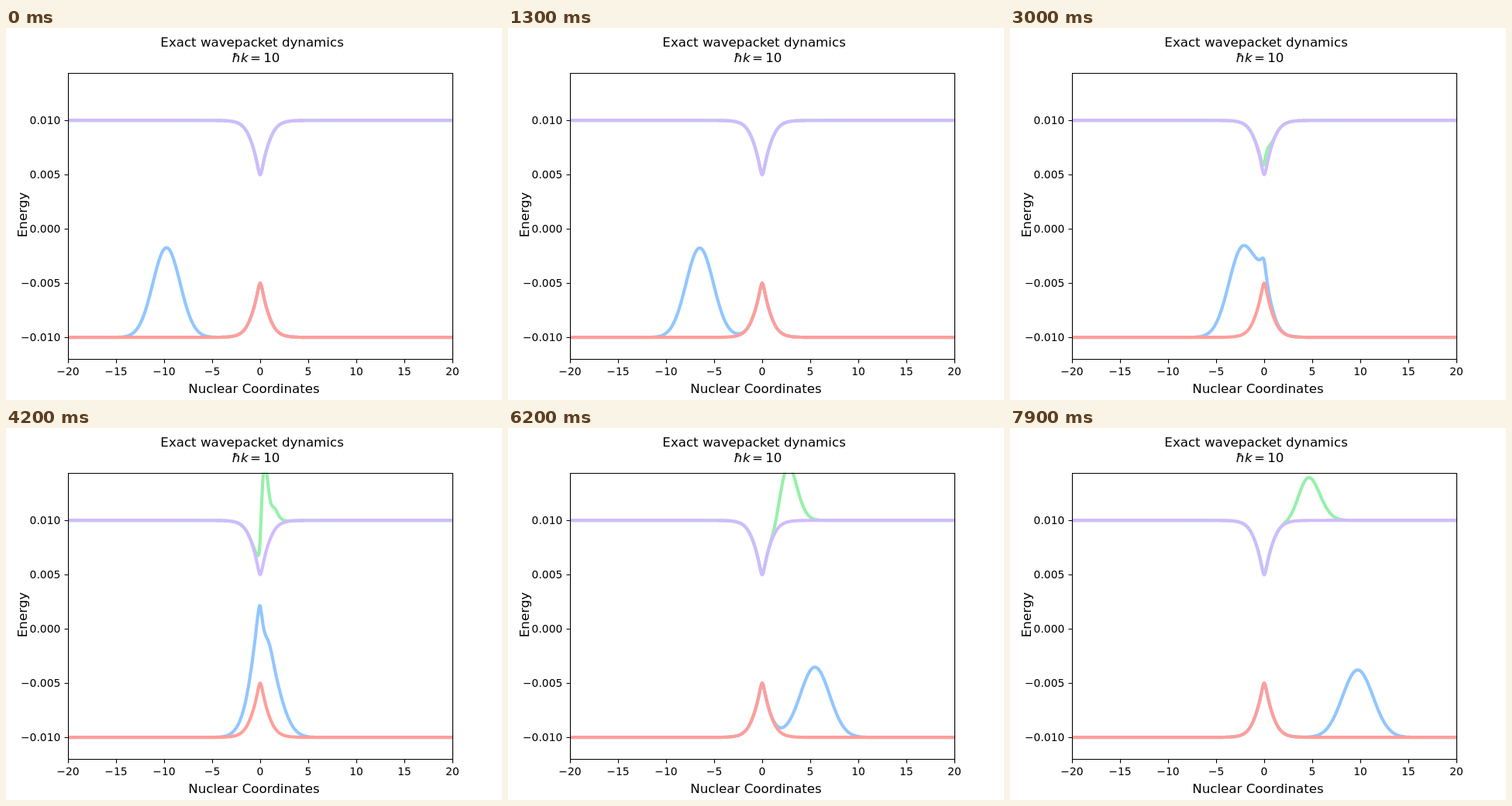
An HTML page that plays this animation: 640x480 px, repeating every 8 s.

```html
<!DOCTYPE html>
<html lang="en">
<head>
<meta charset="utf-8">
<title>Exact wavepacket dynamics</title>
<style>
  html, body { margin: 0; width: 100%; height: 100%; overflow: hidden; background: #fff; }
  svg { display: block; width: 640px; height: 480px; font: 13.889px "DejaVu Sans", sans-serif; }
  .label { font-size: 16.667px; text-anchor: middle; }
  .curve { fill: none; stroke-width: 4.167; stroke-linejoin: round; }
  #axes { fill: none; stroke: #000; stroke-width: 1.111; }
</style>
</head>
<body>
<svg viewBox="0 0 640 480">
  <clipPath id="plot"><rect x="80" y="57.6" width="496" height="369.6"/></clipPath>
  <g clip-path="url(#plot)">
    <path class="curve" id="lowerWave" stroke="#92c6ff"/>
    <path class="curve" id="upperWave" stroke="#97f0aa"/>
    <path class="curve" id="lowerState" stroke="#ff9f9a"/>
    <path class="curve" id="upperState" stroke="#d0bbff"/>
  </g>
  <path id="axes"/>
  <g id="ticks"></g>
  <text class="label" x="317.6" y="24">Exact wavepacket dynamics</text>
  <text y="44" font-size="16.667"><tspan x="291.5" font-style="italic">ħk</tspan><tspan x="315">=</tspan><tspan x="332.2">10</tspan></text>
  <text class="label" x="320" y="471">Nuclear Coordinates</text>
  <text class="label" transform="translate(27 241) rotate(-90)">Energy</text>
</svg>
<script>
const $ = id => document.getElementById(id);
const px = x => 328 + 12.4 * x;
const py = e => 259.2 - 14000 * e;

// Axes and tick labels
let axes = 'M80.5 58.5H576.5V427.5H80.5Z';
const tickText = (x, y, anchor, s) =>
  `<text x="${x}" y="${y}" text-anchor="${anchor}">${s.replace('-', '\u2212')}</text>`;
let labels = '';
for (let x = -20; x <= 20; x += 5) {
  axes += `M${px(x) + 0.5} 427.5v5`;
  labels += tickText(px(x), 448, 'middle', String(x));
}
for (let i = -2; i <= 2; i++) {
  const y = Math.round(py(i * 0.005)) + 0.5;
  axes += `M80.5 ${y}h-5`;
  labels += tickText(70.3, y + 4.5, 'end', (i * 0.005).toFixed(3));
}
$('axes').setAttribute('d', axes);
$('ticks').innerHTML = labels;

// Two-state avoided crossing on a periodic grid
const N = 1024, L = 60, dx = L / N, mass = 2000, k0 = 10, x0 = -10;
const dt = 10, stepsPerFrame = 5, frames = 80, frameMs = 100;
const grid = f => Float64Array.from({ length: N }, (_, i) => f((i - N / 2) * dx, i));
const X = grid(x => x);
const V = grid(x => Math.sign(x) * 0.01 * (1 - Math.exp(-1.6 * Math.abs(x))));
const W = grid(x => 0.005 * Math.exp(-x * x));
const E = grid((x, i) => Math.hypot(V[i], W[i]));
const theta = grid((x, i) => Math.atan2(W[i], V[i]) / 2);

// Initial packet: |psi|^2 has standard deviation sqrt(2)
const amp = x => (4 * Math.PI) ** -0.25 * Math.exp(-((x - x0) ** 2) / 8);
const ar = grid(x => amp(x) * Math.cos(k0 * x)), ai = grid(x => amp(x) * Math.sin(k0 * x));
const br = new Float64Array(N), bi = new Float64Array(N);

const twC = grid((x, i) => Math.cos(2 * Math.PI * i / N));
const twS = grid((x, i) => -Math.sin(2 * Math.PI * i / N));

// In-place radix-2 transform; swapping re and im gives the inverse
function fft(re, im) {
  for (let i = 1, j = 0; i < N; i++) {
    let bit = N >> 1;
    for (; j & bit; bit >>= 1) j ^= bit;
    j ^= bit;
    if (i < j) {
      [re[i], re[j]] = [re[j], re[i]];
      [im[i], im[j]] = [im[j], im[i]];
    }
  }
  for (let half = 1; half < N; half *= 2) {
    const stride = N / (2 * half);
    for (let s = 0; s < N; s += 2 * half) {
      for (let j = 0; j < half; j++) {
        const p = s + j, q = p + half, c = twC[j * stride], d = twS[j * stride];
        const u = re[q] * c - im[q] * d, v = re[q] * d + im[q] * c;
        re[q] = re[p] - u; im[q] = im[p] - v;
        re[p] += u; im[p] += v;
      }
    }
  }
}

const phase = grid((x, i) => {
  const k = 2 * Math.PI / L * (i < N / 2 ? i : i - N);
  return -k * k / (2 * mass) * dt;
});
const kinC = phase.map(p => Math.cos(p) / N), kinS = phase.map(p => Math.sin(p) / N);

function kinetic(re, im) {
  fft(re, im);
  for (let i = 0; i < N; i++) {
    const r = re[i], m = im[i];
    re[i] = r * kinC[i] - m * kinS[i];
    im[i] = r * kinS[i] + m * kinC[i];
  }
  fft(im, re);
}

const potC = E.map(e => Math.cos(e * dt / 2)), potS = E.map(e => Math.sin(e * dt / 2) / e);

function halfPotential() {
  for (let i = 0; i < N; i++) {
    const c = potC[i], v = V[i] * potS[i], w = W[i] * potS[i];
    const a = ar[i], b = ai[i], p = br[i], q = bi[i];
    ar[i] = c * a + v * b + w * q;
    ai[i] = c * b - v * a - w * p;
    br[i] = c * p + w * b - v * q;
    bi[i] = c * q - w * a + v * p;
  }
}

function step() {
  halfPotential();
  kinetic(ar, ai);
  kinetic(br, bi);
  halfPotential();
}

// Population density on the adiabatic state (u, v)
const density = (u, v) => grid((x, i) =>
  (u(theta[i]) * ar[i] + v(theta[i]) * br[i]) ** 2 +
  (u(theta[i]) * ai[i] + v(theta[i]) * bi[i]) ** 2);

const lower = [], upper = [];
for (let f = 0; f < frames; f++) {
  for (let s = 0; s < stepsPerFrame; s++) step();
  lower.push(density(t => -Math.sin(t), Math.cos));
  upper.push(density(Math.cos, Math.sin));
}

// Display scales of the two densities
const lowerGain = 0.0293;
const upperGain = 0.00395 / Math.max(...upper[frames - 1]);

function plot(id, value) {
  const points = [];
  for (let i = 0; i < N; i++) {
    if (Math.abs(X[i]) < 20.5) points.push(px(X[i]).toFixed(2) + ' ' + py(value(i)).toFixed(2));
  }
  $(id).setAttribute('d', 'M' + points.join('L'));
}

plot('lowerState', i => -E[i]);
plot('upperState', i => E[i]);

let shown = -1;
function draw(now) {
  const f = Math.floor(now / frameMs) % frames;
  if (f !== shown) {
    shown = f;
    plot('lowerWave', i => -E[i] + lowerGain * lower[f][i]);
    plot('upperWave', i => E[i] + upperGain * upper[f][i]);
  }
  requestAnimationFrame(draw);
}
draw(0);
</script>
</body>
</html>
```
